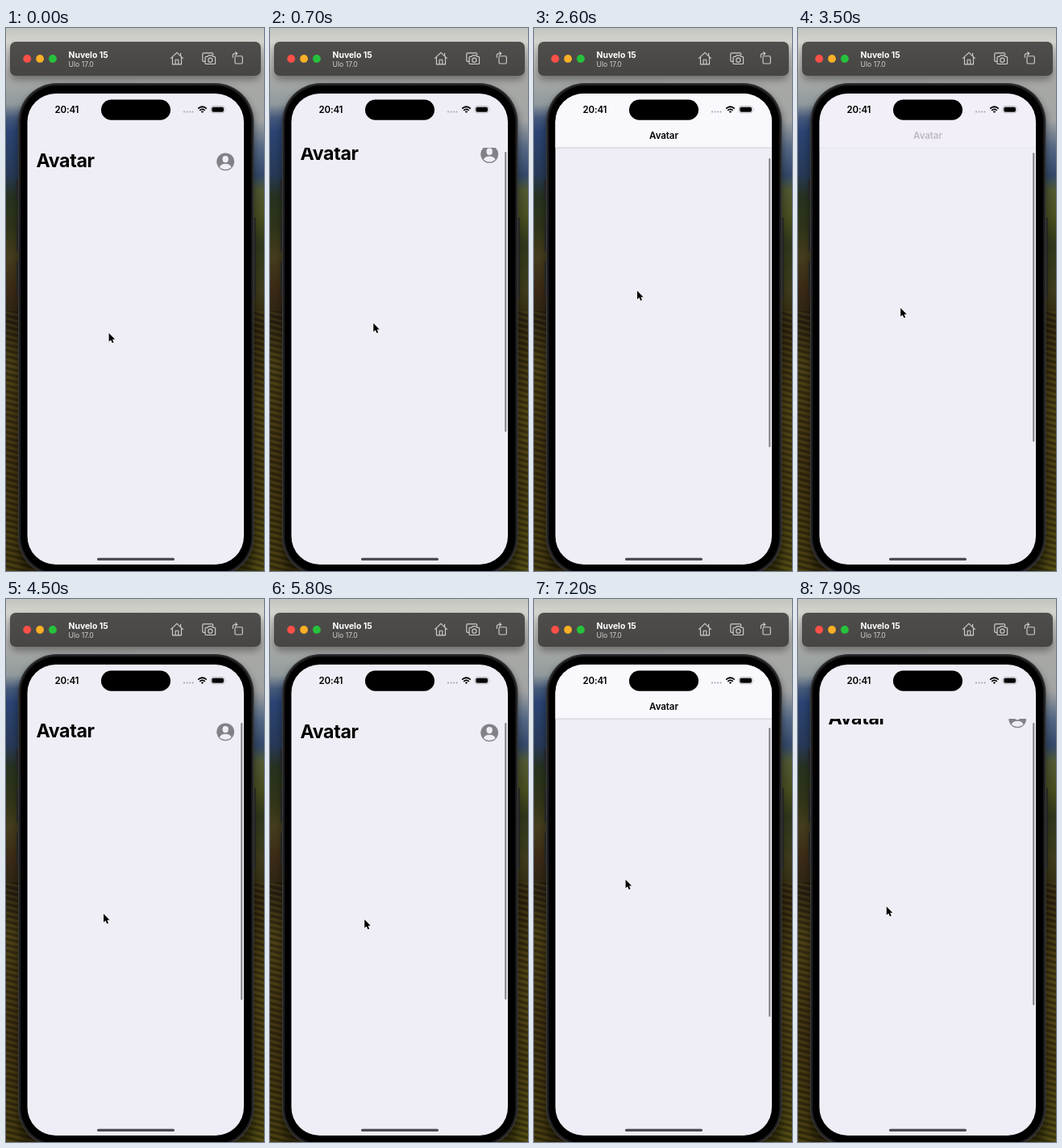
These frames come from a looping animation (320x671 px, 8 s). An HTML page:

```html
<!DOCTYPE html>
<html lang="en">
<head>
<meta charset="utf-8">
<title>Collapsing title</title>
<style>
  html, body { margin: 0; width: 100%; height: 100%; overflow: hidden; background: #222; }
  svg { display: block; width: 100%; height: 100%; }
  text { font-family: Inter, Roboto, sans-serif; }
  .icon { fill: none; stroke: #cfcdcc; stroke-width: 1.15; stroke-linejoin: round; stroke-linecap: round; }
</style>
</head>
<body>
<svg viewBox="0 0 320 671">
  <defs>
    <linearGradient id="left" x2="0" y2="671" gradientUnits="userSpaceOnUse">
      <stop offset="0" stop-color="#c3c4bf"/>
      <stop offset=".025" stop-color="#d4d4ce"/>
      <stop offset=".09" stop-color="#a9aaa7"/>
      <stop offset=".14" stop-color="#929a9d"/>
      <stop offset=".165" stop-color="#45597a"/>
      <stop offset=".19" stop-color="#2b4473"/>
      <stop offset=".27" stop-color="#273957"/>
      <stop offset=".31" stop-color="#26311f"/>
      <stop offset=".37" stop-color="#303518"/>
      <stop offset=".42" stop-color="#453d1d"/>
      <stop offset=".48" stop-color="#3b2a16"/>
      <stop offset=".54" stop-color="#2a2413"/>
      <stop offset=".62" stop-color="#453b14"/>
      <stop offset=".8" stop-color="#3a2d10"/>
      <stop offset="1" stop-color="#41380f"/>
    </linearGradient>
    <linearGradient id="right" x2="0" y2="671" gradientUnits="userSpaceOnUse">
      <stop offset="0" stop-color="#c3c4bf"/>
      <stop offset=".025" stop-color="#d4d4ce"/>
      <stop offset=".09" stop-color="#a9aaa7"/>
      <stop offset=".17" stop-color="#a1a4a3"/>
      <stop offset=".22" stop-color="#566a86"/>
      <stop offset=".27" stop-color="#33496b"/>
      <stop offset=".3" stop-color="#515832"/>
      <stop offset=".35" stop-color="#4a4d20"/>
      <stop offset=".4" stop-color="#2e371b"/>
      <stop offset=".48" stop-color="#3e3c1c"/>
      <stop offset=".55" stop-color="#30260f"/>
      <stop offset=".7" stop-color="#4a3f14"/>
      <stop offset=".85" stop-color="#443911"/>
      <stop offset="1" stop-color="#4b4712"/>
    </linearGradient>
    <linearGradient id="toolbar" x2="0" y2="1">
      <stop offset="0" stop-color="#504e4d"/>
      <stop offset="1" stop-color="#474544"/>
    </linearGradient>
    <pattern id="rows" width="40" height="7" patternUnits="userSpaceOnUse" patternTransform="rotate(14)">
      <path d="M0 1.5H40" stroke="#120d04" stroke-width="2.6"/>
      <path d="M0 5H40" stroke="#766020" stroke-width="1"/>
    </pattern>
    <filter id="blur" x="-20%" y="-20%" width="140%" height="140%"><feGaussianBlur stdDeviation="5"/></filter>
    <clipPath id="screen"><rect x="26.5" y="81" width="268.5" height="582" rx="35"/></clipPath>
    <clipPath id="content"><rect x="26" y="148" width="270" height="516"/></clipPath>
  </defs>

  <!-- wallpaper -->
  <rect width="160" height="671" fill="url(#left)"/>
  <rect x="160" width="160" height="671" fill="url(#right)"/>
  <rect y="350" width="320" height="321" fill="url(#rows)" opacity=".4"/>
  <rect x="5" y="22" width="311" height="42" rx="9" opacity=".35" filter="url(#blur)"/>
  <rect x="15" y="74" width="293" height="620" rx="47" opacity=".45" filter="url(#blur)"/>

  <!-- simulator toolbar -->
  <rect x="5" y="17" width="311" height="42" rx="7" fill="url(#toolbar)"/>
  <circle cx="26.2" cy="38" r="4.9" fill="#fe4f49"/>
  <circle cx="42.1" cy="38" r="4.9" fill="#f8b025"/>
  <circle cx="57.9" cy="38" r="4.9" fill="#27c23c"/>
  <text x="77.5" y="37" font-size="10.4" font-weight="700" fill="#fff">Nuvelo 15</text>
  <text x="77.5" y="47.6" font-size="8.7" fill="#d2d0cf">Ulo 17.0</text>
  <g class="icon">
    <path d="M204.6 37.3L212 30.4L219.4 37.3M206.5 36V44.8H217.5V36M216.6 34V31.2M210.2 44.5V39.2H213.8V44.5"/>
    <path d="M246.6 41.3H245.2Q243.8 41.3 243.8 39.9V32.2Q243.8 30.8 245.2 30.8H255.4Q256.8 30.8 256.8 32.2V33.2"/>
    <path d="M248.4 35.3H250.2L251.2 33.8H255.6L256.6 35.3H258.3Q259.6 35.3 259.6 36.6V43.2Q259.6 44.5 258.3 44.5H248.4Q247.1 44.5 247.1 43.2V36.6Q247.1 35.3 248.4 35.3Z"/>
    <circle cx="253.4" cy="39.7" r="2.6"/>
    <rect x="284" y="34.7" width="9.3" height="9.3" rx="1.2"/>
    <path d="M281.4 36.2V34.2Q281.4 31.5 284.2 31.5H286.6M284.7 29.6L286.8 31.5L284.7 33.4"/>
  </g>

  <!-- phone -->
  <path d="M14.2 186V213M14.2 235V276M14.2 289V330M308.6 234V334" stroke="#232426" stroke-width="2"/>
  <rect x="15" y="68" width="292.5" height="609" rx="48" fill="#39393b"/>
  <rect x="16.2" y="69.2" width="290.1" height="606.6" rx="47" fill="#1d1d1f"/>
  <rect x="18.3" y="71.3" width="285.9" height="602.4" rx="45"/>
  <g clip-path="url(#screen)">
    <rect x="26" y="80" width="270" height="584" fill="#efedf6"/>
    <g clip-path="url(#content)">
      <g id="header">
        <text x="37.4" y="172.4" font-size="23.2" font-weight="700" letter-spacing="-.35">Avatar</text>
        <circle cx="272.2" cy="165.3" r="10.9" fill="#828187"/>
        <g fill="#efedf6">
          <ellipse cx="272.2" cy="162.1" rx="3.7" ry="4.2"/>
          <path d="M264.8 171.9Q266.8 167.8 272.2 167.8T279.6 171.9Q276.5 174.9 272.2 174.9T264.8 171.9Z"/>
        </g>
      </g>
    </g>
    <g id="bar">
      <rect x="26" y="80" width="270" height="68" fill="#f9f8fd"/>
      <rect x="26" y="147.6" width="270" height=".8" fill="#c3c1c9"/>
    </g>
    <text id="small" x="161" y="136.7" font-size="11.6" font-weight="600" text-anchor="middle" letter-spacing="-.1">Avatar</text>
    <rect id="thumb" x="291.2" width="2.1" rx="1" fill="#858489"/>

    <!-- status bar -->
    <text x="75.4" y="105" font-size="11.6" font-weight="600" text-anchor="middle" letter-spacing="-.2">20:41</text>
    <rect x="118" y="88.5" width="86" height="25.3" rx="12.6"/>
    <path d="M221 103.6H232" stroke="#aaa9b0" stroke-width="2.1" stroke-linecap="round" stroke-dasharray="0 3.5"/>
    <g fill="none" stroke="#000" stroke-width="1.7">
      <path d="M238.2 99.6Q243.5 94.9 248.8 99.6M240.2 101.9Q243.5 99 246.8 101.9"/>
    </g>
    <path d="M241.8 103.3Q243.5 101.9 245.2 103.3L243.5 105.1Z"/>
    <rect x="254.3" y="96.6" width="16.8" height="8.3" rx="2.7" fill="none" stroke="#a3a2a9" stroke-width=".7"/>
    <rect x="255.4" y="97.7" width="14.6" height="6.1" rx="1.7"/>
    <path d="M272 99.4Q273.2 100.7 272 102.1Z" fill="#a3a2a9"/>
    <rect x="113" y="654.7" width="96" height="3.3" rx="1.6" fill="#4d4c52"/>
  </g>

  <path id="cursor" d="M0 0V10.6L2.5 8.4L4.2 12.2L6 11.4L4.4 7.7H7.6Z" stroke="#fff" stroke-width="1.3" paint-order="stroke" stroke-linejoin="round"/>
</svg>
<script>
const LOOP = 8000, STEP = 100, COLLAPSE = 36;
const $ = id => document.getElementById(id);
const clamp = v => Math.max(0, Math.min(1, v));
const ease = u => u * u * (3 - 2 * u);
const linear = u => u;

// Tracks are lists of [time, value].
const scroll = [[0, 0], [400, 0], [1300, 36], [1700, 36], [2300, 54], [2900, 54], [3500, 39],
  [4500, 1], [5000, 0], [5800, 0], [6500, 59], [6900, 59], [7900, 17]];
const grip = [[0, 377], [1500, 371], [3500, 385], [4500, 390], [5800, 396], [7900, 397]];
const pointerX = [[0, 127.6], [1500, 129], [3500, 127.2], [4500, 121], [5800, 117.2], [6500, 117.4], [7900, 109.8]];
const smallTitle = [[1100, 0], [1400, 1], [3300, 1], [3500, .22], [3600, 0], [6200, 0], [6400, 1], [7250, 1], [7500, 0]];
const thumbFade = [[100, 0], [400, 1]];

function at(track, t, curve) {
  const i = track.findIndex(key => key[0] > t);
  if (i < 0) return track[track.length - 1][1];
  if (i === 0) return track[0][1];
  const [t0, a] = track[i - 1], [t1, b] = track[i];
  return a + (b - a) * curve((t - t0) / (t1 - t0));
}

function draw(t) {
  const s = at(scroll, t, ease);
  const past = Math.max(0, s - COLLAPSE);
  $('header').setAttribute('transform', `translate(0 ${-s})`);
  $('bar').setAttribute('opacity', clamp(past / 12));
  $('small').setAttribute('opacity', at(smallTitle, t, linear));
  $('thumb').setAttribute('y', 153 + past * .45);
  $('thumb').setAttribute('height', 342 + 15 * clamp(s / COLLAPSE));
  $('thumb').setAttribute('opacity', at(thumbFade, t, linear));
  $('cursor').setAttribute('transform', `translate(${at(pointerX, t, linear)} ${at(grip, t, linear) - s})`);
}

const start = performance.now();
function frame() {
  const t = (performance.now() - start) % LOOP;
  draw(Math.floor(t / STEP) * STEP);
  requestAnimationFrame(frame);
}
frame();
</script>
</body>
</html>
```
